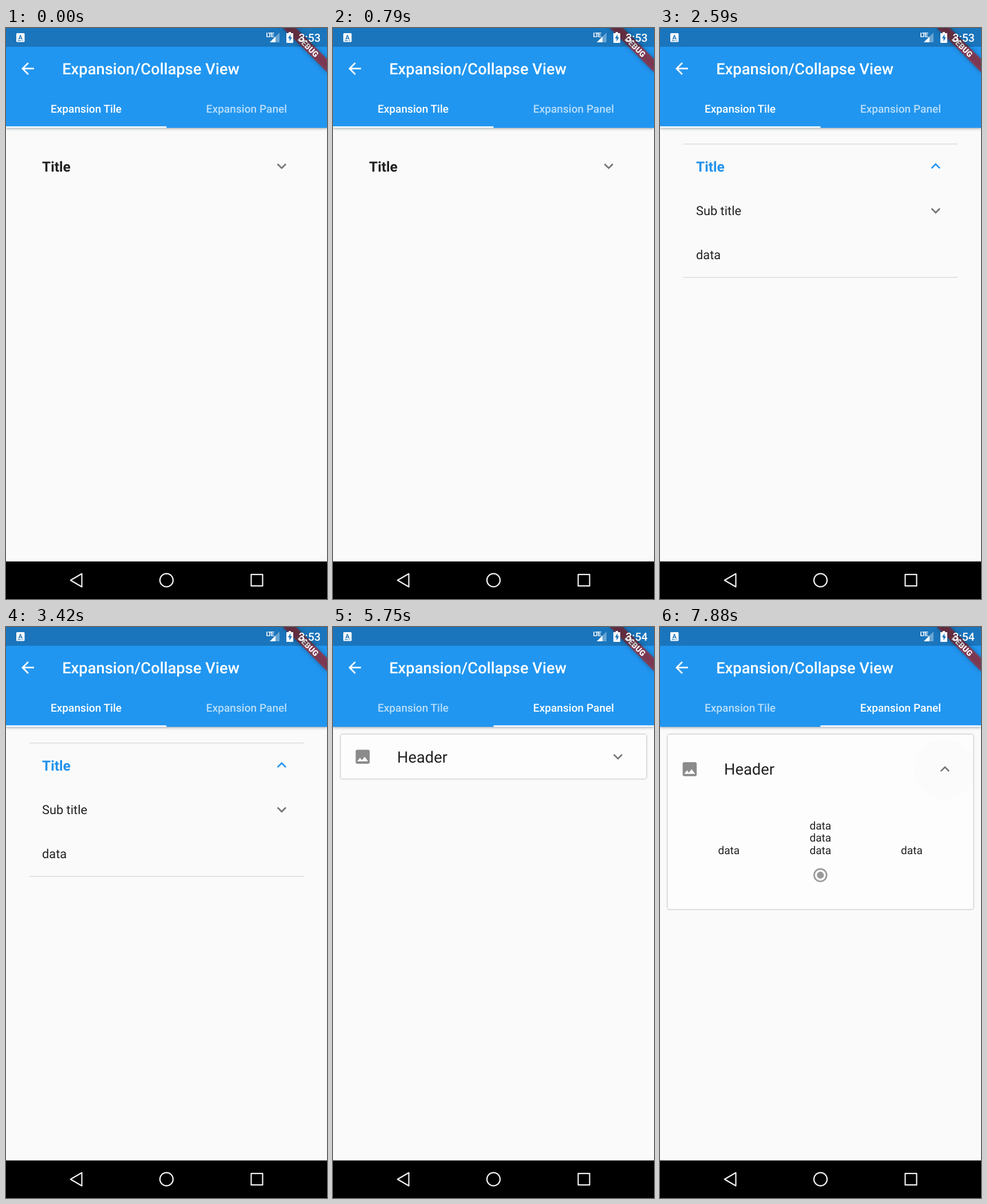
These frames come from a looping animation (561 by 998 pixels, 7920 ms). An HTML page:

```html
<!DOCTYPE html>
<html lang="en">
<head>
<meta charset="utf-8">
<title>Expansion/Collapse View</title>
<style>
  html, body { margin: 0; width: 100%; height: 100%; overflow: hidden; background: #fafafa; }
  svg { display: block; }
  text { font-family: Roboto, sans-serif; text-rendering: geometricPrecision; }
  .medium { font-weight: 500; }
  .bold { font-weight: 700; }
  .mid { text-anchor: middle; }
  .line { stroke: #dcdcdc; stroke-width: 1.6; }
  #bar { filter: drop-shadow(0 1.5px 2.5px rgba(0, 0, 0, .35)); }
  #card { filter: drop-shadow(0 .6px 1.8px rgba(0, 0, 0, .42)); }
  #band { filter: drop-shadow(0 0 4px rgba(0, 0, 0, .5)); }
</style>
</head>
<body>
<svg width="561" height="998" viewBox="0 0 561 998">
  <defs>
    <path id="chevron" transform="scale(1.364) translate(-12 -12)" d="M16.59 8.59L12 13.17 7.41 8.59 6 10l6 6 6-6z"/>
    <clipPath id="cardClip"><rect id="cardEdge" x="13.5" y="188" width="534" rx="2.7"/></clipPath>
  </defs>
  <rect width="561" height="998" fill="#fafafa"/>

  <g id="tilePage" font-size="21.8" fill="#212121">
    <path id="titleTop" class="line" d="M41 202.8H520"/>
    <text id="title" class="bold" x="63" y="250.5" font-size="24.5">Title</text>
    <use id="titleArrow" href="#chevron"/>
    <svg id="titleBody" width="561">
      <g id="titleKids">
        <path id="subTop" class="line" d="M41 280.5H520"/>
        <text id="sub" x="63" y="327">Sub title</text>
        <use id="subArrow" href="#chevron"/>
        <svg id="subBody" width="561">
          <g id="subKids"><text x="63" y="403.7">data</text></g>
        </svg>
        <path id="subBottom" class="line" d="M41 0H520"/>
        <text id="last" x="63">data</text>
      </g>
    </svg>
    <path id="titleBottom" class="line" d="M41 0H520"/>
  </g>

  <g id="panelPage" fill="#212121">
    <rect id="card" x="13.5" y="188" width="534" rx="2.7" fill="#fdfdfd"/>
    <g clip-path="url(#cardClip)">
      <g id="header">
        <circle id="ripple" cx="498" cy="227" fill="#5a5aa8"/>
        <path transform="translate(35.5 210.3) scale(1.364)" fill="#8b8b8b" d="M21 19V5c0-1.1-.9-2-2-2H5c-1.1 0-2 .9-2 2v14c0 1.1.9 2 2 2h14c1.1 0 2-.9 2-2zM8.5 13.5l2.5 3.01L14.5 12l4.5 6H5l3.5-4.5z"/>
        <text x="112" y="236.5" font-size="27.3">Header</text>
        <use id="panelArrow" href="#chevron" fill="#757575"/>
      </g>
      <g id="panelBody" class="mid" font-size="19.1">
        <text x="120.3" y="397.3">data</text>
        <text x="280.3" y="353.5">data</text>
        <text x="280.3" y="375.4">data</text>
        <text x="280.3" y="397.3">data</text>
        <text x="440" y="397.3">data</text>
        <circle cx="280.3" cy="433.7" r="10.9" fill="none" stroke="#999" stroke-width="2.7"/>
        <circle cx="280.3" cy="433.7" r="6.1" fill="#999"/>
      </g>
    </g>
  </g>

  <rect id="bar" width="561" height="174.6" fill="#2196f0"/>
  <g fill="#fff">
    <path transform="translate(21.6 54.6) scale(1.364)" d="M20 11H7.83l5.59-5.59L12 4l-8 8 8 8 1.41-1.41L7.83 13H20v-2z"/>
    <text class="medium" x="98.200" y="81" font-size="27.3">Expansion/Collapse View</text>
    <g class="medium mid" font-size="19.1">
      <text id="tab0" x="140" y="147.5">Expansion Tile</text>
      <text id="tab1" x="420.5" y="147.5">Expansion Panel</text>
    </g>
    <rect id="marker" y="171.9" width="280.5" height="2.7"/>
  </g>

  <g transform="translate(561 0) rotate(45)">
    <rect id="band" x="-54.6" y="38.2" width="109.2" height="16.4" fill="#b71c1c" fill-opacity=".63"/>
    <text class="mid" y="51.3" font-size="13.9" font-weight="900" fill="#fff">DEBUG</text>
  </g>

  <rect width="561" height="32.8" fill-opacity=".22"/>
  <g fill="#fff">
    <rect x="18" y="9" width="14.5" height="15.5" rx="1.5"/>
    <text class="bold mid" x="25.2" y="19.5" font-size="11" fill="#1d75bb">A</text>
    <path d="M20.5 21.8H30" stroke="#1d75bb" stroke-width="1.2" stroke-dasharray="5 1 1 1"/>
    <text class="bold" x="454.5" y="16" font-size="11" letter-spacing="-1.7">LTE</text>
    <path d="M478 8V25H461z" fill-opacity=".35"/>
    <path d="M471 15V25H461z"/>
    <path d="M494 7h4v2h4v17h-12V9h4z"/>
    <path d="M497.3 11l-4.5 7h2.7v5.5l4.5-7.2h-2.7z" fill="#1d75bb"/>
    <text id="clock" class="medium" x="511.5" y="23.7" font-size="19.5"></text>
  </g>

  <rect y="932.4" width="561" height="66"/>
  <g fill="none" stroke="#f0f0f0" stroke-width="2.2" stroke-linejoin="round">
    <path d="M132.5 953.8V976.8L112.8 965.3z"/>
    <circle cx="280.5" cy="965.2" r="11.5"/>
    <rect x="428.5" y="955.2" width="20" height="20"/>
  </g>
</svg>
<script>
const LOOP = 7920;
const START = { title: 2050, sub: 3500, clock: 5000, tab: 5250, tap: 7450, panel: 7550 };
const ROW = 77.2;
const BODY_TOP = 279.6;
const $ = id => document.getElementById(id);
const clamp = v => Math.max(0, Math.min(1, v));
const set = (id, attrs) => {
  for (const key in attrs) $(id).setAttribute(key, attrs[key]);
};

// Cubic Bézier easing solved by bisection.
function bezier(x1, y1, x2, y2) {
  const curve = (a, b, s) => 3 * a * s * (1 - s) ** 2 + 3 * b * s * s * (1 - s) + s ** 3;
  return x => {
    if (x <= 0 || x >= 1) return clamp(x);
    let low = 0, high = 1;
    for (let i = 0; i < 20; i++) {
      const s = (low + high) / 2;
      if (curve(x1, x2, s) < x) low = s; else high = s;
    }
    return curve(y1, y2, low);
  };
}
const easeIn = bezier(.42, 0, 1, 1);
const easeOut = bezier(0, 0, .58, 1);
const ease = bezier(.25, .1, .25, 1);
const standard = bezier(.4, 0, .2, 1);

const mix = (from, to, p) => `rgb(${from.map((v, i) => Math.round(v + (to[i] - v) * p))})`;
const BLUE = [33, 146, 236];
const move = (x, y) => `translate(${x} ${y})`;
const arrow = (id, x, y, p) => set(id, { transform: `${move(x, y)} rotate(${180 * p})` });

// Colours, arrow and borders of one expansion tile.
function tile(id, y, p) {
  const e = easeIn(p);
  set(id, { fill: mix([33, 33, 33], BLUE, e) });
  set(id + "Arrow", { fill: mix([117, 117, 117], BLUE, e) });
  arrow(id + "Arrow", 481.8, y, e);
  for (const side of ["Top", "Bottom"]) set(id + side, { opacity: easeOut(p) });
  return e;
}

// Reveals content from its vertical centre.
function reveal(id, top, full, height) {
  set(id + "Body", { y: top, height });
  set(id + "Kids", { transform: move(0, -top - (full - height) / 2) });
}

function drawTiles(t) {
  const progress = key => clamp((t - START[key]) / 200);
  const titleOpen = tile("title", 241.4, progress("title"));
  const subHeight = ROW * tile("sub", 319.2, progress("sub"));
  const full = 156.2 + subHeight;
  const height = full * titleOpen;
  reveal("sub", 358, ROW, subHeight);
  reveal("title", BODY_TOP, full, height);
  set("subBottom", { transform: move(0, 357.4 + subHeight) });
  set("last", { y: 404.1 + subHeight });
  set("titleBottom", { transform: move(0, BODY_TOP + height) });
}

function drawTabs(t) {
  const p = ease(clamp((t - START.tab) / 300));
  set("tilePage", { transform: move(-561 * p, 0) });
  set("panelPage", { transform: move(561 * (1 - p), 0) });
  set("marker", { x: 280.5 * p });
  set("tab0", { "fill-opacity": 1 - .32 * p });
  set("tab1", { "fill-opacity": .68 + .32 * p });
}

function drawPanel(t) {
  const p = clamp((t - START.panel) / 200);
  const e = standard(p);
  const height = 77 + 228 * e;
  set("card", { height });
  set("cardEdge", { height });
  set("header", { transform: move(0, 21.8 * e) });
  arrow("panelArrow", 498, 226.6, e);
  set("panelBody", {
    opacity: standard(clamp((p - .4) / .6)),
    transform: move(0, 43.6 * (e - 1))
  });
  const age = t - START.tap;
  set("ripple", {
    r: 53 * easeOut(clamp(age / 200)),
    opacity: age < 0 ? 0 : .08 - .068 * clamp((age - 150) / 250)
  });
}

function frame(now) {
  const t = now % LOOP;
  drawTiles(t);
  drawTabs(t);
  drawPanel(t);
  $("clock").textContent = t < START.clock ? "3:53" : "3:54";
  requestAnimationFrame(frame);
}
frame(0);
</script>
</body>
</html>
```
